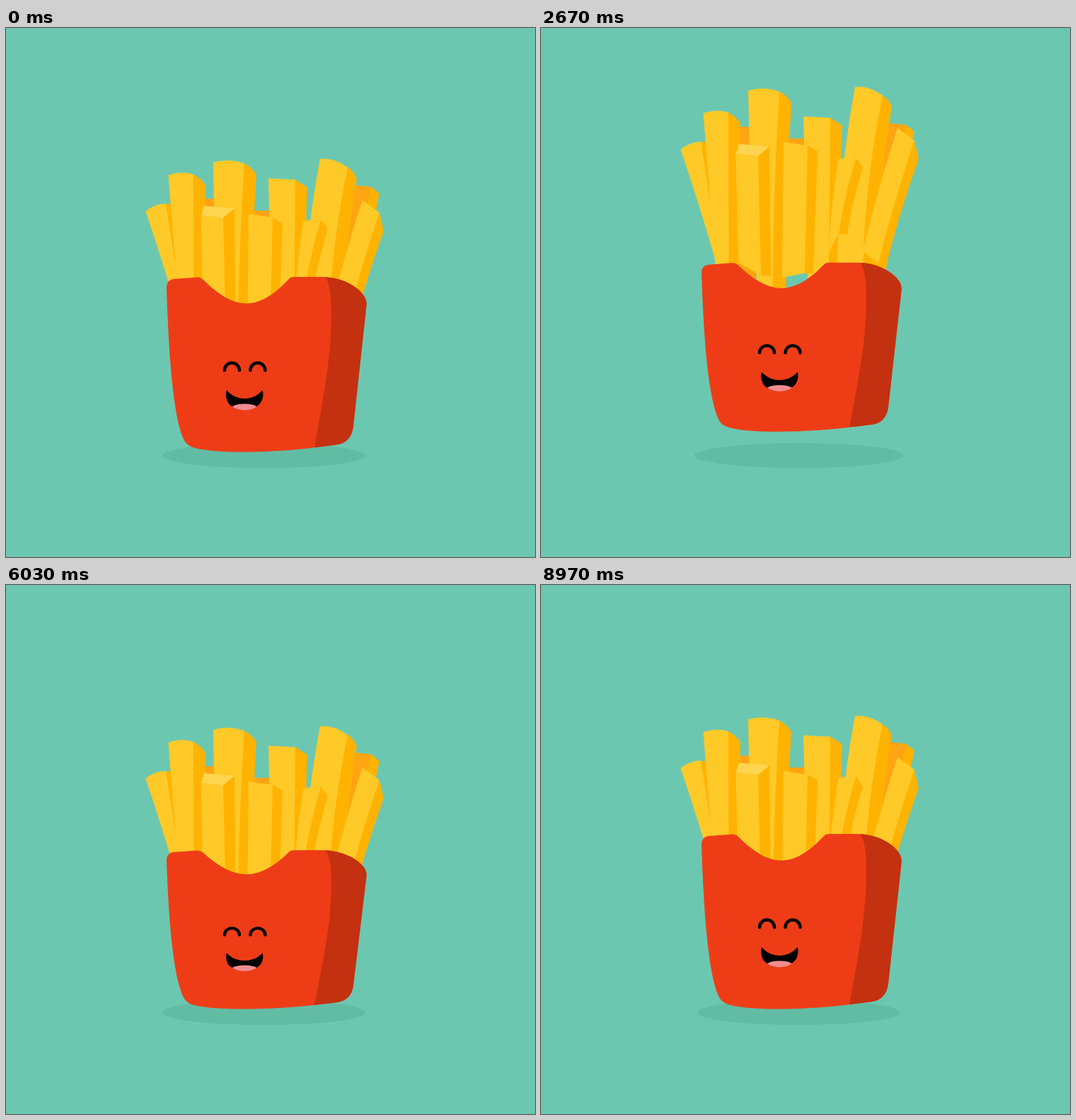
Animation, 748 px wide and 748 px high, one loop 9000 ms. Source, as an HTML page:

```html
<!DOCTYPE html>
<html lang="en">
<head>
<meta charset="utf-8">
<title>Jumping fries</title>
<style>
html, body { margin: 0; width: 100%; height: 100%; overflow: hidden; background: #6cc7b1; }
svg { display: block; width: 100vw; height: 100vh; }
</style>
</head>
<body>
<svg viewBox="0 0 748 748">
  <defs>
    <path id="carton" d="M227 368Q226.500 357 236 355L270 352.500Q275 352 279 356C300 377 320 389.500 340 389.500C362 389.500 382 374 399 356Q402 352 407 352H447C475 352 500 366 508 382Q510.500 388 509.500 394L491 564Q488 587 466 589.500C430 594 390 599.500 335 599.500C305 599.500 285 598 268 594C258 591.500 254 588 250 579C236 545 230 460 227 368Z"/>
    <clipPath id="inside"><use href="#carton"/></clipPath>
  </defs>
  <ellipse id="shadow" cx="364.5" cy="604.5" rx="143.5" ry="17.7" fill="#62bca4"/>
  <g id="fries"></g>
  <g id="box">
    <use href="#carton" fill="#ee3d16"/>
    <path clip-path="url(#inside)" fill="#c43110" d="M447 350C458 353 460 380 460 405C460 470 447 530 436 594V610H530V350Z"/>
    <path fill="none" stroke="#000" stroke-width="4.5" stroke-linecap="round" d="M309 484a10.500 10.500 0 0 1 21 0M345.500 484a10.500 10.500 0 0 1 21 0"/>
    <path d="M312 512C325 528 350 528 362.500 512Q365.500 521 360 530C350 543 324 543 314 530Q309.500 521 312 512Z"/>
    <path fill="#ef8b8f" d="M320 535.500C325 530 350 530 354.500 535.500C345 542 330 542 320 535.500Z"/>
  </g>
</svg>
<script>
const LOOP = 9000;
const STARTS = [360, 2160, 3960, 5850, 7560];
const LAUNCH = 444, PEAK = 650;
const YELLOW = '#ffc928', AMBER = '#ffb300', ORANGE = '#ffa412', PALE = '#ffd54f';

// How high each group flies, and how long and how sharply it drops.
const hops = {
  box: { height: 38.5, drop: 225, power: 2 },
  low: { height: 117, drop: 258, power: 4 },
  high: { height: 136, drop: 258, power: 4 },
  lateLow: { height: 117, drop: 338, power: 3 },
  lateHigh: { height: 136, drop: 338, power: 3 }
};

const $ = id => document.getElementById(id);
const svgNode = (tag, attrs, parent) => {
  const node = document.createElementNS('http://www.w3.org/2000/svg', tag);
  for (const key in attrs) node.setAttribute(key, attrs[key]);
  return parent.appendChild(node);
};

// A fry has a front face (top-left x, y; width w; slope) and a side face
// (side, fall); foot values place the lower end, bow bends it, arch rounds the top.
const parts = [];
function fry(hop, { x, y, w, slope = 0, side = 0, fall = 0, footX, footY, footW,
    tilt = 0, footSide = side && 12, bow = 0, arch = 0, color = YELLOW, cap }) {
  const node = svgNode('g', {}, $('fries'));
  const rx = x + w, ry = y + slope, cx = rx + side, cy = ry + fall;
  const bx = footX + footW, by = footY + tilt;
  const edge = (x0, y0, x1, y1) => `Q${(x0 + x1) / 2 + bow} ${(y0 + y1) / 2} ${x1} ${y1}`;
  if (side) {
    svgNode('path', { fill: AMBER, d: `M${rx - 3} ${ry}H${rx}
      Q${(rx + cx) / 2 + arch / 3} ${(ry + cy) / 2 - arch / 3} ${cx} ${cy}
      ${edge(cx, cy, bx + footSide, by)}H${bx - 3}${edge(bx - 3, by, rx - 3, ry)}Z` }, node);
  }
  svgNode('path', { fill: color, d: `M${x} ${y}Q${x + w / 2} ${y + slope / 2 - arch} ${rx} ${ry}
    ${edge(rx, ry, bx, by)}L${footX} ${footY}${edge(footX, footY, x, y)}Z` }, node);
  if (cap) {
    svgNode('path', { fill: PALE, d: `M${x + cap} ${cy - slope}L${cx} ${cy}L${rx} ${ry}L${x} ${y}Z` }, node);
  }
  parts.push({ hop, node });
}

// Back to front.
fry('lateLow', { x: 484, y: 221, w: 32, slope: 3.5, side: 12, fall: 9.5, footX: 452, footY: 460, footW: 16, tilt: 6, color: ORANGE });
fry('high', { x: 275, y: 241.5, w: 21, footX: 271, footY: 478, footW: 33, color: ORANGE });
fry('high', { x: 345, y: 258, w: 28, footX: 348, footY: 440, footW: 25, color: ORANGE });
fry('lateLow', { x: 197.5, y: 259, w: 28.5, slope: -10.5, side: 22, fall: 4.5, footX: 249, footY: 424, footW: 2, bow: 2, arch: 6 });
fry('low', { x: 229.5, y: 208, w: 35.5, slope: -1, side: 17, fall: 15, footX: 248.5, footY: 448, footW: 17, arch: 6 });
fry('lateHigh', { x: 293, y: 190, w: 44, slope: 1.5, side: 17, fall: 15.5, footX: 307, footY: 486, footW: 21, tilt: -3, footSide: 19, bow: -5, arch: 7 });
fry('low', { x: 371, y: 212.5, w: 38, slope: 2, side: 17, fall: 10.5, footX: 378, footY: 468, footW: 29, tilt: -23 });
fry('high', { x: 444, y: 185, w: 39, slope: 12, side: 13, fall: 16, footX: 419, footY: 480, footW: 36, footSide: 24, bow: -15, arch: 8 });
fry('high', { x: 343, y: 263, w: 34, slope: 5, side: 14, fall: 8, footX: 341, footY: 454.5, footW: 32, tilt: -6 });
fry('low', { x: 275.5, y: 265, w: 31.5, slope: 3.5, side: 16, fall: -13.5, footX: 279, footY: 419.5, footW: 32, tilt: 18, footSide: 14, cap: 4.5 });
fry('lateLow', { x: 420.5, y: 273, w: 24.5, slope: -2, side: 10, fall: 14, footX: 407, footY: 404, footW: 14, tilt: -25, bow: -4, arch: 2 });
fry('high', { x: 504, y: 243, w: 24, slope: 18, side: 6, fall: 26, footX: 455, footY: 417.5, footW: 22, tilt: 17, bow: -4 });

const clamp = v => Math.min(1, Math.max(0, v));
const smooth = v => v * v * (3 - 2 * v);
const pulse = (t, from, top, to) =>
  smooth(clamp(t < top ? (t - from) / (top - from) : (to - t) / (to - top)));

// Share of full height: quick launch, brief hang, accelerating drop.
const arc = (t, { drop, power }) => t < PEAK
  ? 1 - (1 - clamp((t - LAUNCH) / (PEAK - LAUNCH))) ** 3.5
  : 1 - clamp((t - PEAK) / drop) ** power;

function fryOffset(t, hop) {
  const land = PEAK + hop.drop;
  const dip = 18 * pulse(t, 0, 250, LAUNCH) + 12 * pulse(t, land, land + 70, land + 260);
  return dip - hop.height * arc(t, hop);
}

function draw(time) {
  const t = Math.max(0, time - (STARTS.filter(s => s <= time).pop() ?? time));
  for (const { hop, node } of parts) {
    node.setAttribute('transform', `translate(0 ${fryOffset(t, hops[hop])})`);
  }
  const scale = 1 - .143 * (pulse(t, 0, 300, 610) + pulse(t, 590, 880, 1300));
  const shift = 599.5 * (1 - scale) - hops.box.height * arc(t, hops.box);
  $('box').setAttribute('transform', `translate(0 ${shift}) scale(1 ${scale})`);
  $('shadow').setAttribute('rx', 143.5 + 18 * pulse(t, 450, 640, 890));
}

const begin = performance.now();
function tick() {
  draw((performance.now() - begin) % LOOP);
  requestAnimationFrame(tick);
}
tick();
</script>
</body>
</html>
```
